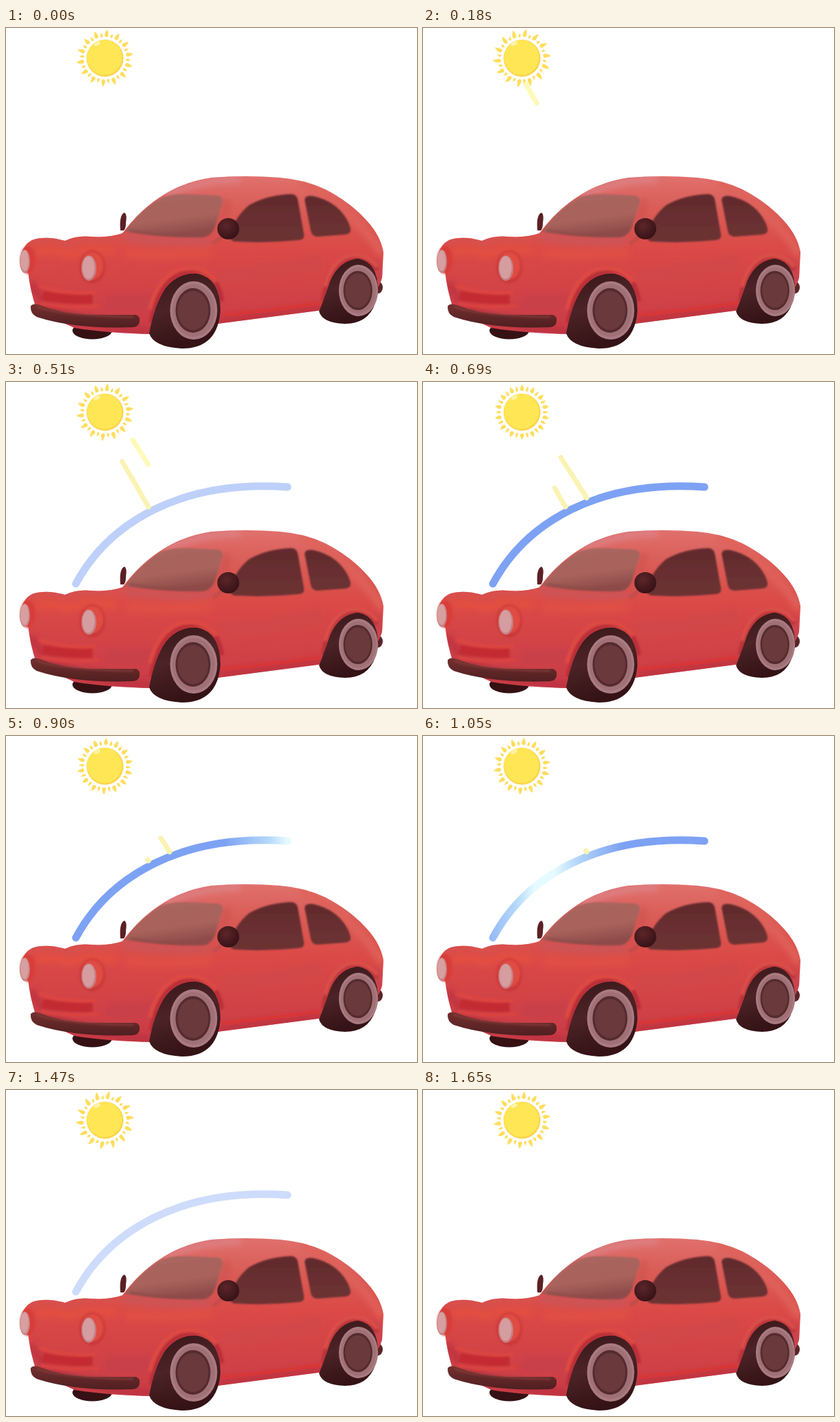
Animation of 600 by 475 pixels, one loop 1.68 s. Source, as an HTML page:

```html
<!DOCTYPE html>
<html lang="en">
<head>
<meta charset="utf-8">
<title>Sun and car</title>
<style>
  html, body { margin: 0; width: 100%; height: 100%; overflow: hidden; background: #fff; }
  svg { display: block; width: 100%; height: 100%; }
</style>
</head>
<body>
<svg viewBox="0 0 600 475" preserveAspectRatio="none">
  <defs>
    <linearGradient id="paint" x1="0" y1="0" x2="0" y2="1">
      <stop offset="0" stop-color="#e0706c"/>
      <stop offset=".2" stop-color="#da5d58"/>
      <stop offset=".45" stop-color="#db4a46"/>
      <stop offset=".72" stop-color="#d24347"/>
      <stop offset="1" stop-color="#c93c46"/>
    </linearGradient>
    <linearGradient id="windshield" x1="0" y1="0" x2=".3" y2="1">
      <stop offset="0" stop-color="#a9665f"/>
      <stop offset=".65" stop-color="#a9635c"/>
      <stop offset="1" stop-color="#8f4c4a"/>
    </linearGradient>
    <linearGradient id="glass" x1="0" y1="0" x2="0" y2="1">
      <stop offset="0" stop-color="#622b2d"/>
      <stop offset="1" stop-color="#6d3234"/>
    </linearGradient>
    <linearGradient id="bumper" x1="0" y1="0" x2="0" y2="1">
      <stop offset="0" stop-color="#74302f"/>
      <stop offset="1" stop-color="#501f21"/>
    </linearGradient>
    <linearGradient id="tire" x1="0" y1="0" x2=".3" y2="1">
      <stop offset="0" stop-color="#38171a"/>
      <stop offset=".5" stop-color="#4c2326"/>
      <stop offset="1" stop-color="#341215"/>
    </linearGradient>
    <radialGradient id="mirror" cx=".4" cy=".35" r=".7">
      <stop offset="0" stop-color="#5c2629"/>
      <stop offset="1" stop-color="#351116"/>
    </radialGradient>
    <linearGradient id="shield" gradientUnits="userSpaceOnUse" x1="-110" x2="110" y1="0" y2="0">
      <stop offset="0" stop-color="#7da2f4"/>
      <stop offset=".3" stop-color="#b5d9fa"/>
      <stop offset=".42" stop-color="#e6fbff"/>
      <stop offset=".55" stop-color="#e6fbff"/>
      <stop offset=".72" stop-color="#b0d3fa"/>
      <stop offset="1" stop-color="#7da2f4"/>
    </linearGradient>
    <filter id="soft" x="-50%" y="-50%" width="200%" height="200%"><feGaussianBlur stdDeviation="5"/></filter>
    <filter id="fine" x="-30%" y="-30%" width="160%" height="160%"><feGaussianBlur stdDeviation="1.6"/></filter>
    <filter id="edge"><feGaussianBlur stdDeviation=".8"/></filter>
    <path id="body" d="M22 330 Q26 315 38 309 Q58 302 86 310 Q104 302 124 304 Q150 306 170 299 Q195 266 224 247 Q258 224 300 218 Q350 214 400 218 Q436 221 466 235 Q503 254 527 281 Q547 303 551 327 L549 364 Q546 374 540 382 L470 410 L316 430 L217 446 Q150 445 100 437 L45 412 Q35 382 32 354 Z"/>
    <clipPath id="inside"><use href="#body"/></clipPath>
    <g id="wheel">
      <ellipse rx="34.5" ry="42.5" fill="#a97b80"/>
      <ellipse rx="31" ry="38.5" fill="#9f7075"/>
      <ellipse cx="-1" rx="25.5" ry="32.5" fill="#552b2e"/>
      <ellipse cx="-1" rx="22.5" ry="28.5" fill="#6a393b"/>
    </g>
  </defs>

  <g id="beams" fill="none" stroke="#fefab9" stroke-width="7" stroke-linecap="round"></g>
  <path id="arc" d="M102 294 C150 205 255 142 411 153" fill="none" stroke="url(#shield)" stroke-width="11" stroke-linecap="round"/>
  <g id="glints" fill="none" stroke="#fbf3b2" stroke-width="7" stroke-linecap="round"></g>

  <g>
    <path id="rays" fill="#ffdd5c"/>
    <circle cx="144.5" cy="44" r="27" fill="#fcd34c"/>
    <circle cx="143.8" cy="43" r="25.6" fill="#ffe655"/>
    <ellipse cx="133" cy="23" rx="5" ry="2.5" fill="#fff3a6" transform="rotate(-28 133 23)"/>
  </g>

  <g>
    <ellipse cx="126" cy="441" rx="29" ry="12.5" fill="#351114"/>
    <ellipse cx="543" cy="378" rx="7" ry="9" fill="#5a2529"/>
    <path d="M167 295 Q165 272 173 269 Q177 271 175 284 Q175 292 172 295 Z" fill="#5b2024"/>
    <use href="#body" fill="url(#paint)"/>

    <g clip-path="url(#inside)">
      <g filter="url(#soft)" fill="none">
        <path d="M34 312 Q62 300 88 315 Q120 299 160 307" stroke="#d5514f" stroke-width="7"/>
        <path d="M44 328 Q64 318 90 330 Q120 317 160 326" stroke="#e4503f" stroke-width="11"/>
        <path d="M170 304 Q240 316 300 309" stroke="#cb5558" stroke-width="11"/>
        <path d="M175 328 Q235 332 300 326" stroke="#e04f45" stroke-width="14"/>
        <path d="M230 243 Q300 218 342 221" stroke="#dd8287" stroke-width="9"/>
        <path d="M322 250 Q322 275 306 303" stroke="#cf5351" stroke-width="9"/>
        <path d="M430 224 Q510 265 550 330" stroke="#df625a" stroke-width="12"/>
        <path d="M312 362 Q390 358 460 340" stroke="#d2474a" stroke-width="22"/>
        <path d="M36 370 Q60 430 215 443" stroke="#bd3140" stroke-width="11"/>
        <path d="M145 398 Q180 405 214 396" stroke="#c94048" stroke-width="22"/>
        <path d="M312 428 L465 408" stroke="#bd3040" stroke-width="10"/>
        <path d="M535 340 Q546 350 545 375" stroke="#c9434d" stroke-width="12"/>
      </g>
      <g filter="url(#fine)" fill="none" stroke-linecap="round">
        <path d="M316 418 Q390 411 458 401" stroke="#dc3633" stroke-width="4"/>
        <path d="M55 383 Q90 390 126 388 L127 402 Q90 404 52 396 Z" fill="#c42c33"/>
        <path d="M50 376 Q90 389 130 385" stroke="#dd4540" stroke-width="5"/>
        <path d="M53 401 Q90 410 134 405" stroke="#da4341" stroke-width="5"/>
      </g>
    </g>

    <g fill="none" filter="url(#fine)">
      <path d="M212 430 Q218 392 236 371 Q256 352 284 354 Q309 361 315 398" stroke="#b92d37" stroke-width="7"/>
      <path d="M210 410 Q220 368 250 353 Q286 343 307 370" stroke="#de4a43" stroke-width="6"/>
      <path d="M463 398 Q470 355 490 341 Q518 323 542 352" stroke="#b93039" stroke-width="7"/>
      <path d="M466 377 Q474 345 496 334 Q522 325 542 348" stroke="#da4f4a" stroke-width="5"/>
    </g>

    <path d="M209 445 Q217 402 233 379 Q251 356 280 358 Q313 365 313 412 Q309 467 257 467 Q216 465 209 445 Z" fill="url(#tire)"/>
    <use href="#wheel" transform="translate(274 411.5)"/>
    <path d="M457 413 Q463 398 470 378 Q482 339 514 336 Q543 341 543 382 Q538 431 495 431 Q462 430 457 413 Z" fill="url(#tire)"/>
    <use href="#wheel" transform="translate(514.5 382.5) scale(.83 .88)"/>

    <path d="M36 405 Q40 400 50 404 Q80 416 120 418 L190 418 Q196 420 195 428 Q194 435 185 436 Q100 439 45 421 Q35 416 36 405 Z" fill="url(#bumper)"/>
    <path d="M45 406 Q80 419 186 421" fill="none" stroke="#8a3e3a" stroke-width="2" filter="url(#fine)"/>

    <g filter="url(#fine)">
      <ellipse cx="32" cy="338" rx="11" ry="20" fill="#d83e39"/>
      <ellipse cx="126" cy="348" rx="19" ry="24" fill="#c93839"/>
      <ellipse cx="126" cy="346" rx="16" ry="20" fill="#e04b43"/>
    </g>
    <ellipse cx="27.5" cy="340" rx="7.5" ry="17" fill="#c88586"/>
    <ellipse cx="27" cy="339" rx="6" ry="15" fill="#d79fa0"/>
    <ellipse cx="121" cy="350" rx="11" ry="18.5" fill="#c77d80"/>
    <ellipse cx="120.5" cy="349" rx="9" ry="16.5" fill="#d59da0"/>

    <g filter="url(#edge)">
      <path d="M174 297 Q192 269 224 249 Q237 242 262 242 L309 244 Q318 246 316 255 L306 287 Q301 303 288 305 Q240 307 174 297 Z" fill="url(#windshield)"/>
      <path d="M328 304 Q331 278 355 258 Q382 243 416 242 Q424 242 426 250 L435 301 Q436 308 428 309 Q380 314 333 311 Q327 310 328 304 Z" fill="url(#glass)"/>
      <path d="M436 251 Q436 243 449 245 Q477 251 493 272 Q501 283 503 293 Q504 300 495 301 L455 304 Q447 304 445 296 Z" fill="url(#glass)"/>
    </g>
    <path d="M181 295 Q230 304 287 301" fill="none" stroke="#8a4a48" stroke-width="4" opacity=".55" filter="url(#fine)"/>
    <path d="M304 313 L317 303" stroke="#c64d4b" stroke-width="6" stroke-linecap="round"/>
    <ellipse cx="324.5" cy="292.5" rx="16" ry="15.5" fill="url(#mirror)"/>
  </g>
</svg>

<script>
  const LOOP = 1680;
  const byId = id => document.getElementById(id);

  // Linear interpolation through [time, value] pairs.
  function track(points, t) {
    if (t <= points[0][0]) return points[0][1];
    for (let i = 1; i < points.length; i++) {
      const [t0, v0] = points[i - 1], [t1, v1] = points[i];
      if (t <= t1) return v0 + (v1 - v0) * (t - t0) / (t1 - t0);
    }
    return points[points.length - 1][1];
  }

  const beams = [
    { from: [149, 80], to: [208, 182],
      head: [[60, 0], [360, .72], [480, 1]],
      tail: [[330, 0], [360, .03], [690, .73], [900, .98], [960, 1]] },
    { from: [170, 61], to: [239, 169],
      head: [[310, 0], [360, .09], [660, 1]],
      tail: [[360, .02], [690, .45], [900, .81], [1050, .98], [1110, 1]] }
  ];
  for (const beam of beams) {
    beam.line = document.createElementNS("http://www.w3.org/2000/svg", "path");
    byId("beams").append(beam.line);
  }

  function drawBeam({ from, to, head, tail, line }, t) {
    const start = track(tail, t), end = track(head, t);
    const at = k => from.map((v, i) => v + (to[i] - v) * k).join(" ");
    line.setAttribute("d", end > start ? `M${at(start)}L${at(end)}` : "");
    // A beam that touches the shield rests on top of it.
    byId(end === 1 ? "glints" : "beams").append(line);
  }

  const swing = [[0, .45], [360, 1], [690, 0], [900, .25], [1050, .45], [1290, 1], [1650, .5], [1680, .45]];
  const RAYS = 14;

  function drawRays(t) {
    const s = track(swing, t);
    const turn = s * 9, lean = Math.max(0, s - .45) * .15;
    let d = "";
    for (let i = 0; i < RAYS * 2; i++) {
      const angle = (i * 180 / RAYS + turn - 90) * Math.PI / 180;
      const long = i % 2 === 0;
      const inner = long ? 31 : 30.5;
      const outer = long ? 40.5 + 3 * s : 39 - 3 * s;
      const half = long ? .085 : .055;
      const at = (r, a) =>
        `${(144.5 + r * Math.cos(angle + a)).toFixed(2)} ${(44 + r * Math.sin(angle + a)).toFixed(2)}`;
      const middle = inner + 3;
      d += `M${at(inner, 0)}Q${at(inner, -half)} ${at(middle, -half)}` +
           `Q${at(outer - 3, -half * .6)} ${at(outer, lean)}` +
           `Q${at(outer - 3, half * .7)} ${at(middle, half)}Q${at(inner, half)} ${at(inner, 0)}Z`;
    }
    byId("rays").setAttribute("d", d);
  }

  function render(now) {
    const t = now % LOOP;
    drawRays(t);
    beams.forEach(beam => drawBeam(beam, t));
    byId("arc").setAttribute("opacity", track([[390, 0], [630, 1], [1260, 1], [1290, .95], [1590, 0]], t));
    const shine = track([[810, 560], [900, 430], [1050, 182], [1230, -120]], t);
    byId("shield").setAttribute("gradientTransform", `translate(${shine} 0)`);
  }

  const begin = performance.now();
  function tick() {
    render(performance.now() - begin);
    requestAnimationFrame(tick);
  }
  tick();
</script>
</body>
</html>
```
